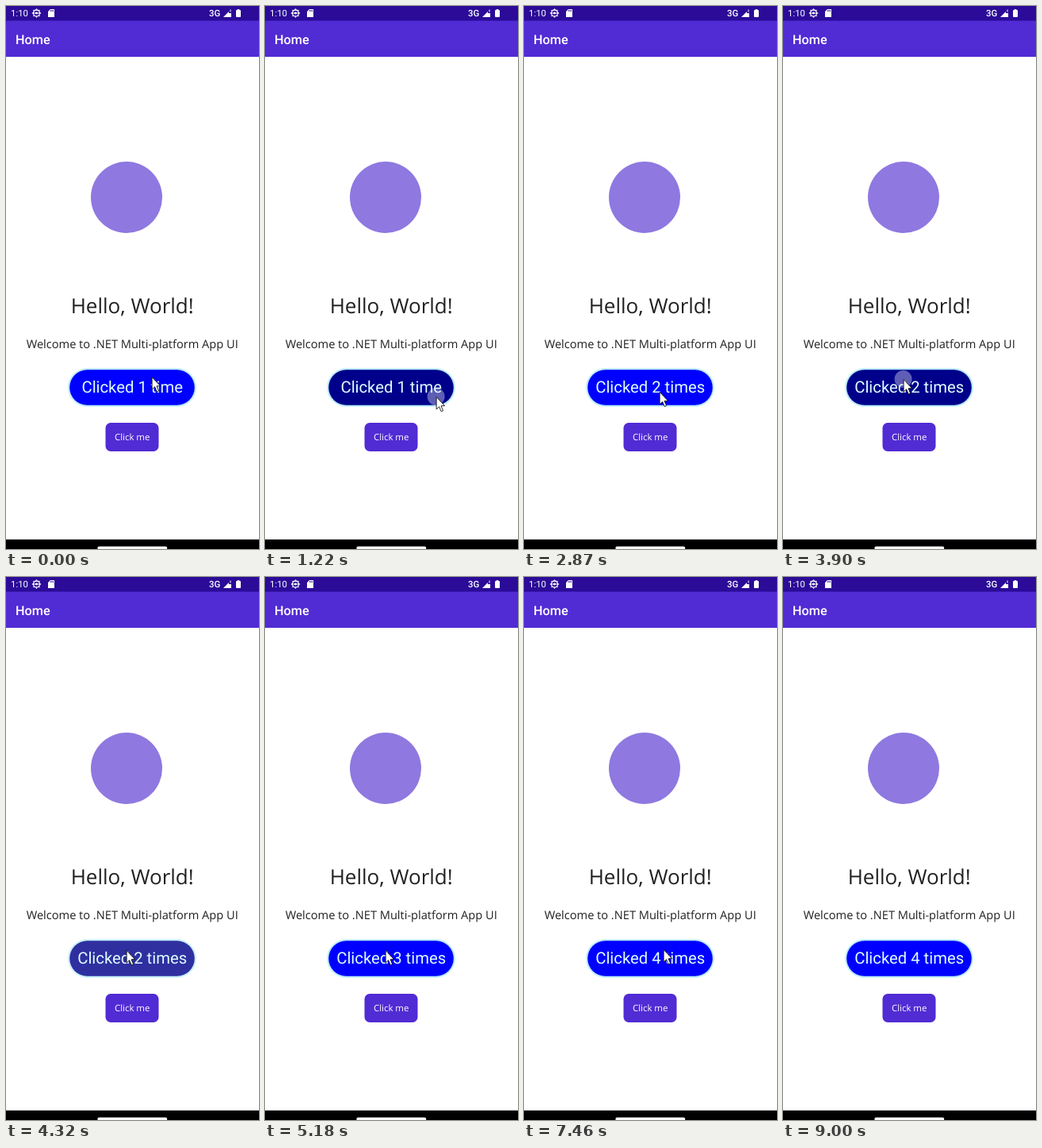
Animation of 319x684 px, one loop 9.71 s. Source, as an HTML page with a canvas:

```html
<!DOCTYPE html>
<html lang="en">
<head>
<meta charset="utf-8">
<title>Home</title>
<style>
  html, body { margin: 0; width: 100%; height: 100%; overflow: hidden; background: #fff; }
  canvas { display: block; width: 319px; height: 684px; }
</style>
</head>
<body>
<canvas id="stage"></canvas>
<script>
const W = 319, H = 684, CX = 159.2, LOOP = 9710;
const TICK = 135; // motion advances in visible steps of this length
const ROBOTO = 'Roboto, sans-serif', OPEN = '"Open Sans", sans-serif';
const PURPLE = '#512bd4', STATUS = '#2b0b98';

const start = { x: 183.6, y: 467 };
const moves = [
  { at: 430, steps: 2, x: 187, y: 476 },
  { at: 700, steps: 3, x: 215.6, y: 492 },
  { at: 2620, steps: 3, x: 165, y: 485 },
  { at: 3170, steps: 4, x: 151.6, y: 470 },
  { at: 5330, steps: 5, x: 175.6, y: 469 },
  { at: 8880, steps: 1, x: 222, y: 588 }
];
const cursorGone = 9000;

const presses = [
  { down: 1220, up: 2620 },
  { down: 3900, up: 5180 },
  { down: 6020, up: 7460 }
];

const canvas = document.getElementById('stage');
const ctx = canvas.getContext('2d');
const dpr = window.devicePixelRatio || 1;
canvas.width = Math.round(W * dpr);
canvas.height = Math.round(H * dpr);

const clamp = v => Math.min(1, Math.max(0, v));
const mix = (a, b, p) => a + (b - a) * p;
const easeOut = p => 1 - (1 - p) ** 2;
const ticks = ms => Math.floor(ms / TICK);

function cursorAt(t) {
  let { x, y } = start;
  for (const m of moves) {
    const p = easeOut(clamp((ticks(t - m.at) + 1) / m.steps));
    x = mix(x, m.x, p);
    y = mix(y, m.y, p);
  }
  return { x, y };
}

function fill(color) {
  ctx.fillStyle = color;
  ctx.fill();
}

function rect(x, y, w, h, color) {
  ctx.fillStyle = color;
  ctx.fillRect(x, y, w, h);
}

function round(x, y, w, h, r, color) {
  ctx.beginPath();
  ctx.roundRect(x, y, w, h, r);
  fill(color);
}

function disc(x, y, r, color) {
  ctx.beginPath();
  ctx.arc(x, y, r, 0, Math.PI * 2);
  fill(color);
}

function poly(points, color) {
  ctx.beginPath();
  points.forEach(([x, y]) => ctx.lineTo(x, y));
  ctx.closePath();
  fill(color);
}

function text(str, x, y, font, color, align = 'center') {
  ctx.font = font;
  ctx.textAlign = align;
  ctx.textRendering = 'geometricPrecision';
  ctx.fillStyle = color;
  ctx.fillText(str, x, y);
}

function drawWheel(x, y) {
  ctx.strokeStyle = '#fff';
  ctx.lineWidth = 1.3;
  ctx.beginPath();
  ctx.arc(x, y, 4, 0, Math.PI * 2);
  ctx.stroke();
  for (let i = 0; i < 8; i++) {
    const a = i * Math.PI / 4;
    disc(x + 5 * Math.cos(a), y + 5 * Math.sin(a), .8, '#fff');
  }
  rect(x - 3.5, y - .5, 7, 1, '#fff');
  disc(x, y, 1.4, '#fff');
}

function drawStatusBar() {
  rect(0, 0, W, 18.5, STATUS);
  text('1:10', 6, 13, `11.4px ${ROBOTO}`, '#fff', 'left');
  drawWheel(38.5, 9);

  // Memory card
  poly([[56, 4], [61, 4], [61, 14], [53, 14], [53, 7]], '#fff');
  for (let i = 0; i < 3; i++) rect(56 + i * 1.6, 5, .8, 2, STATUS);

  // Signal and battery
  text('3G', 256, 13, `500 11.4px ${ROBOTO}`, '#fff', 'left');
  poly([[284, 4], [284, 14], [274, 14]], '#fff');
  rect(281, 3, 4, 6, STATUS);
  rect(282.5, 4.5, 1, 3, '#fff');
  round(290, 5, 6, 9, 1, '#fff');
  rect(291.7, 4, 2.6, 1.5, '#fff');
}

function drawPage() {
  rect(0, 0, W, H, '#fff');
  rect(0, 18, W, 46, PURPLE);
  drawStatusBar();
  text('Home', 12, 48, `500 16.25px ${ROBOTO}`, '#fff', 'left');

  disc(152, 241, 45, '#8f78e0');

  text('Hello, World!', CX, 387, `26px ${OPEN}`, '#212121');
  text('Welcome to .NET Multi-platform App UI', CX, 431, `14.6px ${OPEN}`, '#212121');

  round(125.5, 525, 67, 36, 6.5, PURPLE);
  text('Click me', CX, 547, `11.4px ${OPEN}`, '#fff');

  rect(0, 672, W, 12, '#000');
  round(115.4, 680.8, 87.8, 4, 2, '#fff');
}

// Grows from the touch point, then fades while the button stays held
function drawRipple(down, t) {
  const age = ticks(t - down) * TICK;
  const radius = 11 + 160 * (age / 400) ** 2;
  const alpha = .37 * clamp(2 - age / (2 * TICK));
  const { x, y } = cursorAt(down);
  ctx.save();
  ctx.beginPath();
  ctx.roundRect(78.2, 456.3, 161.6, 48.4, 24.2);
  ctx.clip();
  disc(x, y, radius, `rgba(255,255,255,${alpha})`);
  ctx.restore();
}

function drawCounter(t) {
  const press = presses.find(p => t >= p.down && t < p.up);
  const count = 1 + presses.filter(p => t >= p.up).length;

  round(78.2, 456.3, 161.6, 48.4, 24.2, '#b9eaf8');
  round(80.2, 458.3, 157.6, 44.4, 22.2, press ? '#00008b' : '#0000ff');
  if (press) drawRipple(press.down, t);

  const label = `Clicked ${count} time${count > 1 ? 's' : ''}`;
  text(label, CX, 487, `20.3px ${ROBOTO}`, '#e0ffff');
}

function drawCursor(t) {
  if (t >= cursorGone) return;
  const { x, y } = cursorAt(t);
  ctx.save();
  ctx.translate(x, y);
  poly([[.5, .5], [.5, 16], [4, 12.7], [6.6, 18.8], [9, 17.8], [6.4, 11.8], [11, 11.6]], '#fff');
  ctx.strokeStyle = '#111';
  ctx.lineWidth = .9;
  ctx.stroke();
  ctx.restore();
}

function frame() {
  const t = performance.now() % LOOP;
  ctx.setTransform(dpr, 0, 0, dpr, 0, 0);
  drawPage();
  drawCounter(t);
  drawCursor(t);
  requestAnimationFrame(frame);
}
frame();
</script>
</body>
</html>
```
